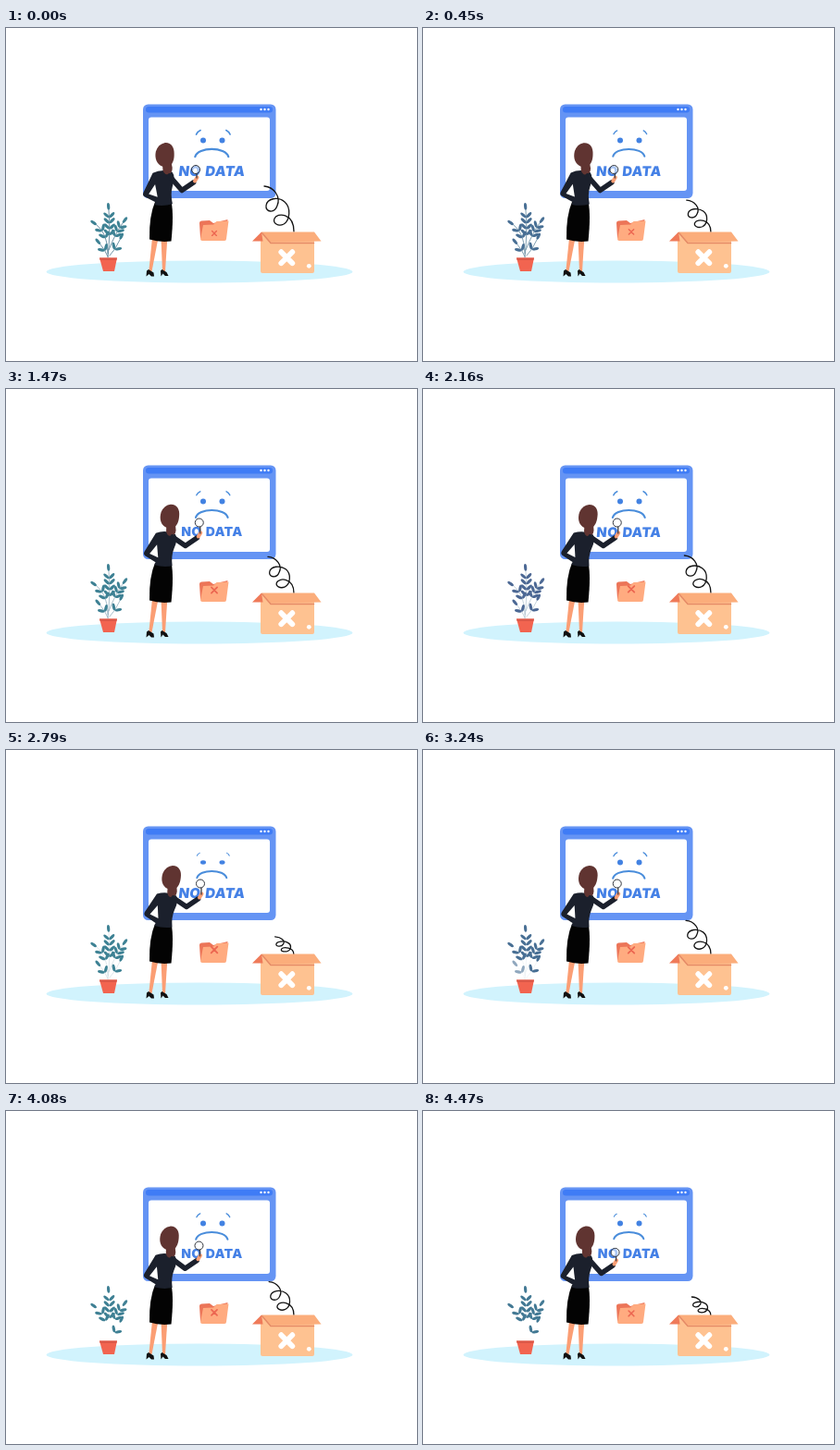
An HTML page for the animation above (4500 ms loop, 444 by 360 pixels).

```html
<!DOCTYPE html>
<html lang="en">
<head>
<meta charset="utf-8">
<title>No data</title>
<style>
html, body { margin: 0; width: 100%; height: 100%; overflow: hidden; background: #fff; }
svg { display: block; width: 444px; height: 360px; }
.line { fill: none; stroke-linecap: round; stroke-linejoin: round; }
text { font: 900 15px Inter, sans-serif; letter-spacing: .4px; word-spacing: 1.5px; fill: #4581e6; text-anchor: middle; }
</style>
</head>
<body>
<svg viewBox="0 0 444 360">
  <ellipse cx="209" cy="263.5" rx="165.5" ry="12" fill="#d1f3fd"/>

  <!-- browser window -->
  <rect x="148" y="82.5" width="143.5" height="101.5" rx="5.5" fill="#6594f4"/>
  <rect x="151" y="85" width="137" height="6.5" rx="3" fill="#3f7cf6"/>
  <g fill="#fff">
    <circle cx="275.5" cy="88" r="1.2"/><circle cx="279.5" cy="88" r="1.2"/><circle cx="283.5" cy="88" r="1.2"/>
    <rect x="154" y="96.5" width="131" height="79.5" rx="3"/>
  </g>
  <g fill="#4282e2">
    <ellipse id="eyeL" cx="213" cy="121.5" rx="3"/>
    <ellipse id="eyeR" cx="233.5" cy="121.5" rx="3"/>
  </g>
  <g class="line" stroke="#4a8ddb">
    <path id="mouth" d="M-18 8.5C-15 -2.5 15 -2.5 18 8.5" stroke-width="2.2"/>
    <path id="browL" d="M-2.3 2.3Q-1 -.8 2.3 -2.3" stroke-width="1.6"/>
    <path id="browR" d="M-2 -2.3Q1.2 -.8 2.3 2.3" stroke-width="1.6"/>
  </g>
  <text id="label" y="5.3">NO DATA</text>

  <!-- plant -->
  <g id="plant"></g>
  <path d="M101 248.5H120L117 263H105Z" fill="#f26450"/>
  <path d="M101 248.5H120L119.3 251H101.7Z" fill="#dc5848"/>

  <!-- folder -->
  <path d="M209 211Q209 208.5 211.5 208.5L220 208L224 211L239.5 207L237 222L210 227Z" fill="#ec7558"/>
  <path d="M213 213L224 212.5L227.5 209L240.5 208.5L238 228Q238 230 236 230H212Q210 230 210 228Z" fill="#ffab80"/>
  <path id="folderX" class="line" d="M-3 -3L3 3M3 -3L-3 3" stroke="#ec6650" stroke-width="1.7"/>

  <!-- spring and box -->
  <path id="spring" class="line" stroke="#141414" stroke-width="1.3" vector-effect="non-scaling-stroke"
    d="M279 171C290 172 297 183 293 192C290 201 280 199 281 192C282 184 294 182 301 188C308 194 307 208 300 212C294 215 288 211 290 206C293 199 311 200 311 220"/>
  <path d="M275 221H333V263Q333 265 331 265H277Q275 265 275 263Z" fill="#fec291"/>
  <path d="M276 220.5H333L340.5 230.5L286 231.5Z" fill="#fbad7b"/>
  <path d="M276 220.5L266 230.5H277.5Z" fill="#ef7a59"/>
  <path class="line" d="M276.5 221.5L286 232.5H332.5" stroke="#e58a66" stroke-width="1.5"/>
  <path class="line" d="M297.3 242.2L309.3 254.2M309.3 242.2L297.3 254.2" stroke="#fff" stroke-width="5.8"/>
  <circle cx="327.3" cy="257.3" r="2.4" fill="#fff"/>

  <!-- woman -->
  <g fill="#fb9e74">
    <path d="M158 227H164.5L157.5 263H154.3Z"/>
    <path d="M167.5 227H174.3L172 263H169Z"/>
  </g>
  <path d="M154 261L159.5 264.5L160 268.5H157L154.5 266L151.5 268.5L152 262.5Z" fill="#111"/>
  <path d="M168.5 261L173.5 264L175.5 268H172L169.5 265.5L167.5 268.5L167 262.5Z" fill="#111"/>
  <path d="M161 188H178.5Q181.5 201 178.5 230.5Q166 232 155 228.5Q154.5 203 161 188Z" fill="#030303"/>
  <g id="body">
    <path d="M163 155.5Q174 152 184 157.5Q187 163 182 173Q178.5 181 179.5 191.5Q170 193 160.5 190L161.5 187L150.5 179.5Q148.5 177.5 150 175Z" fill="#1b202c"/>
    <path d="M163.8 168L164.5 182L155.5 177.5Z" fill="#fff"/>
    <path d="M180 125C187 125 190 131 188.8 138C188 145 186 147 184.5 149Q186 158 179.5 159.5Q173 159 174.5 150C168.5 147 167 140 169.5 133Q173 125.5 180 125Z" fill="#603431"/>
  </g>
  <path id="arm" class="line" stroke="#1b202c" stroke-width="5.6"/>
  <path id="hand" class="line" d="M-2 3.5L.5 -.5" stroke="#fb9e74" stroke-width="4"/>
  <path id="handle" class="line" stroke="#3c3c42" stroke-width="1.3"/>
  <circle id="lens" r="4.5" fill="#fff" fill-opacity=".55" stroke="#30343c" stroke-width="1"/>
</svg>
<script>
const LOOP = 4500;
const $ = id => document.getElementById(id);
const set = (id, attrs) => { for (const k in attrs) $(id).setAttribute(k, attrs[k]); };
const place = (id, x, y, rest = '') => set(id, { transform: `translate(${x} ${y}) ${rest}` });
const clamp = (v, lo = 0, hi = 1) => Math.min(hi, Math.max(lo, v));
const smooth = v => { v = clamp(v); return v * v * (3 - 2 * v); };
const wave = (t, period) => Math.cos(2 * Math.PI * t / period);

// a curved stem with leaf pairs along its upper half
function branch(x0, y0, x1, y1, x2, y2, pairs) {
  const heading = (dx, dy) => Math.atan2(dy, dx) * 180 / Math.PI;
  const leaf = (x, y, a) => `<ellipse cx="4.2" rx="3.9" ry="1.6" transform="translate(${x} ${y}) rotate(${a})"/>`;
  let leaves = leaf(x2, y2, heading(x2 - x1, y2 - y1));
  for (let i = 0; i < pairs; i++) {
    const u = .45 + .5 * i / pairs, w = 1 - u;
    const x = w * w * x0 + 2 * w * u * x1 + u * u * x2;
    const y = w * w * y0 + 2 * w * u * y1 + u * u * y2;
    const a = heading(w * (x1 - x0) + u * (x2 - x1), w * (y1 - y0) + u * (y2 - y1));
    leaves += leaf(x, y, a - 45) + leaf(x, y, a + 45);
  }
  return `<path class="line stem" d="M${x0} ${y0}Q${x1} ${y1} ${x2} ${y2}" stroke="#4c7890" stroke-width=".8"/>${leaves}`;
}
$('plant').innerHTML = branch(110, 248, 113, 220, 111, 197, 4)
  + branch(110, 244, 110, 222, 98, 213, 2)
  + branch(111, 240, 118, 222, 126, 211, 3)
  + branch(112, 246, 118, 240, 123, 229, 1)
  + `<g id="lowLeaves">${branch(110, 247, 107, 240, 102, 234, 1)}</g>`;
const stems = document.querySelectorAll('.stem');

function draw(t) {
  const pulse = wave(t, 2700);
  place('label', 222.5, 154.5, `skewX(${-4 - 3 * pulse}) scale(${.96 + .04 * pulse})`);

  const bounce = .69 + .31 * wave(t, 1830);
  place('spring', 310.5, 221, `scale(${.4 + .6 * bounce} ${bounce}) translate(-310.5 -221)`);

  const open = 3 * clamp(Math.abs(t % 2000 - 820) / 40, .1);
  set('eyeL', { ry: open });
  set('eyeR', { ry: open });
  place('mouth', 222.3, 130.7, `scale(${.82 + .18 * bounce})`);
  place('browL', 207.8, 112.8, `scale(${.4 + .6 * bounce})`);
  place('browR', 239.8, 112.8, `scale(${.4 + .6 * bounce})`);

  // she leans in, then lifts the magnifier
  const reach = Math.sin(Math.PI * t / 5400);
  const lift = smooth((reach - .5) / .25);
  const lean = 8 * (reach - 1);
  const hx = 206 + 5 * reach, hy = 162 - 6 * lift;
  const lx = hx - 1, ly = 153 - 8.5 * lift;
  set('body', { transform: `rotate(${lean} 170 188)` });
  set('arm', { d: `M${181 + lean * .55} 160L${hx - 16} ${hy + 13.5}L${hx - 3.5} ${hy + 5}` });
  place('hand', hx, hy);
  set('handle', { d: `M${hx} ${hy}L${lx + 1} ${ly + 4.5}` });
  place('lens', lx, ly);

  place('folderX', 225, 222 - 6 * reach, `scale(${.8 + .3 * reach})`);

  const teal = .5 + .5 * wave(t, 1400);
  set('plant', { fill: `rgb(${76 - 14 * teal},${103 + 27 * teal},148)` });
  stems.forEach(stem => stem.style.opacity = clamp(1 - t / 3600));
  set('lowLeaves', { opacity: clamp((3600 - t) / 600) });
}

function frame() {
  draw(performance.now() % LOOP);
  requestAnimationFrame(frame);
}
frame();
</script>
</body>
</html>
```
